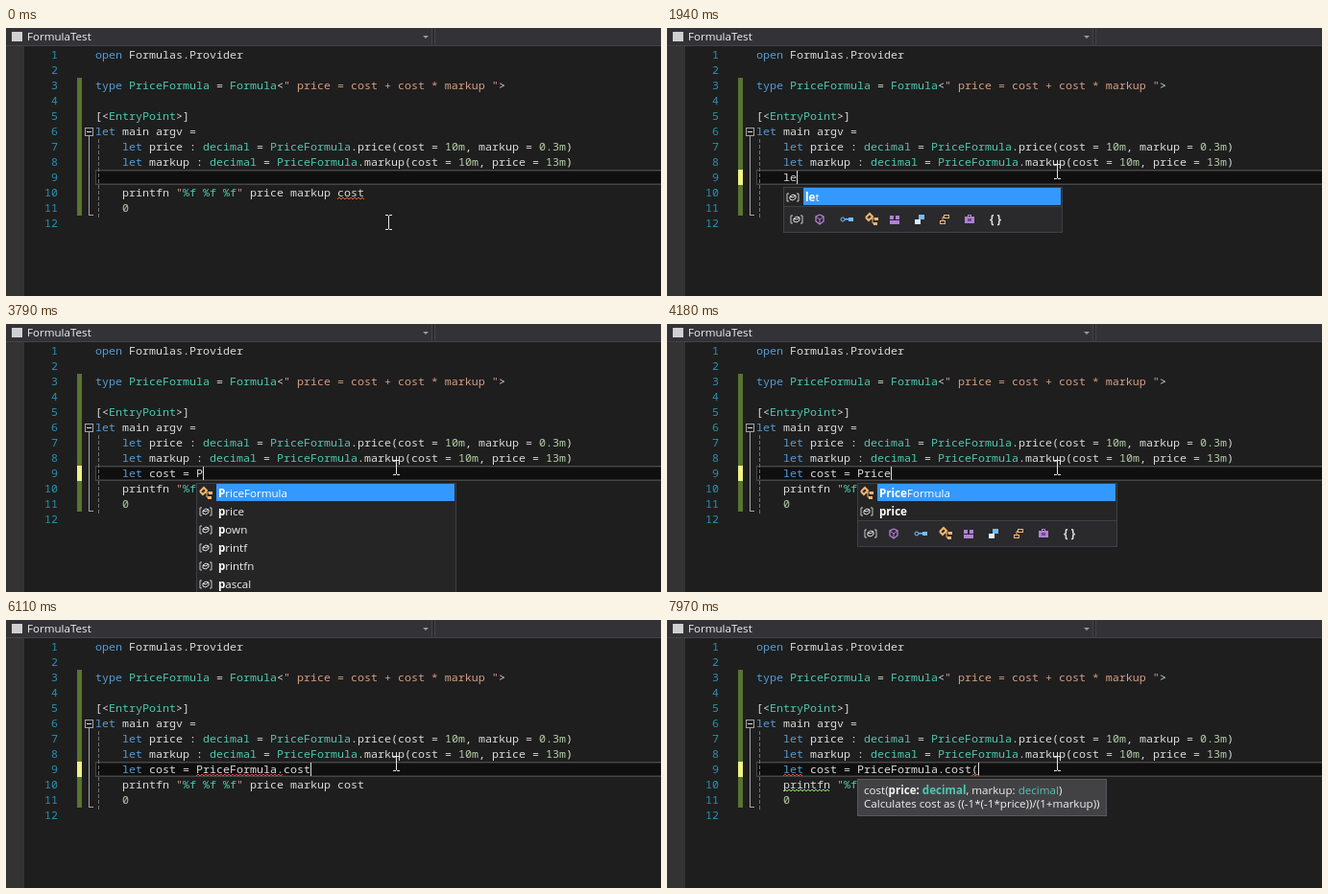
Recreate the animation shown at these times as an HTML page with a canvas. Size 682x280 px, loop 8 s.

```html
<!DOCTYPE html>
<html lang="en">
<head>
<meta charset="utf-8">
<title>Formula editor</title>
<style>
  html, body { margin: 0; width: 100%; height: 100%; overflow: hidden; background: #1e1e1e; }
  canvas { display: block; }
</style>
</head>
<body>
<canvas id="stage" width="682" height="280"></canvas>
<script>
const ctx = document.getElementById('stage').getContext('2d');
const LOOP = 8000, CHAR = 7, CODE_X = 93, EDIT_X = 121, EDIT_LINE = 9;
const MONO = '11.6667px "Noto Sans Mono", monospace';
const UI = '11.6px "Open Sans", sans-serif';
const PLAIN = '#dcdcdc', KEYWORD = '#569cd6', TYPE = '#4ec9b0', STRING = '#d69d85', NUMBER = '#b5cea8';
const ORANGE = '#efb672', PURPLE = '#b180d7', BLUE = '#75beff', RED = '#f0483e', GREEN = '#95db7d';

const lines = [
  'open Formulas.Provider',
  '',
  'type PriceFormula = Formula<" price = cost + cost * markup ">',
  '',
  '[<EntryPoint>]',
  'let main argv =',
  '    let price : decimal = PriceFormula.price(cost = 10m, markup = 0.3m)',
  '    let markup : decimal = PriceFormula.markup(cost = 10m, price = 13m)',
  '',
  '    printfn "%f %f %f" price markup cost',
  '    0',
  ''
];

const typed = 'let cost = PriceFormula.cost(';
// [time, characters typed]; each entry also restarts the caret blink
const keys = [
  [80, 0], [1770, 1], [1920, 2], [2080, 3], [2240, 4], [2470, 5], [2620, 6], [2770, 7], [2850, 8],
  [3020, 9], [3250, 10], [3400, 11], [3710, 12], [3860, 13], [3940, 14], [4020, 15], [4180, 16],
  [4350, 16], [5030, 23], [5340, 24], [5890, 25], [5970, 28], [6900, 29]
];
const mousePath = [[70, 398, 203], [400, 101, 156], [650, 300, 123], [910, 406, 150]];

const lists = [
  { from: 1840, to: 2240, col: 0, width: 291, filters: true,
    items: ['let', 'lazy', 'ldexp', 'List', 'list', 'lock', 'log', 'log10'] },
  { from: 3790, to: 5030, col: 11, width: 271, filters: true,
    items: ['PriceFormula', 'price', 'pown', 'printf', 'printfn', 'pascal', 'pi'] },
  { from: 5420, to: 6110, col: 24, width: 92, filters: false, items: ['cost', 'markup', 'price'] }
];

const lineTop = n => 4 + 16 * n;

function rect(x, y, w, h, color) {
  ctx.fillStyle = color;
  ctx.fillRect(x, y, w, h);
}

function frame(x, y, w, h, color) {
  ctx.strokeStyle = color;
  ctx.strokeRect(x + .5, y + .5, w - 1, h - 1);
}

function path(points, color, width = 1) {
  ctx.beginPath();
  points.forEach(([x, y]) => ctx.lineTo(x, y));
  ctx.strokeStyle = color;
  ctx.lineWidth = width;
  ctx.stroke();
  ctx.lineWidth = 1;
}

// Draws text and returns the x where it ends
function text(str, x, y, color, font) {
  ctx.font = font;
  ctx.fillStyle = color;
  ctx.fillText(str, x, y);
  return x + ctx.measureText(str).width;
}

function tokenColor(token) {
  if (/^(open|type|let)$/.test(token)) return KEYWORD;
  if (/^(PriceFormula|Formula|EntryPoint|decimal|%f)$/.test(token)) return TYPE;
  if (token[0] === '"') return STRING;
  return /^\d/.test(token) ? NUMBER : PLAIN;
}

function code(str, x, n, color = tokenColor) {
  for (const m of str.matchAll(/"[^"%]*"|%f|\d[\d.]*m?|\w+|[^\s\w]/g))
    text(m[0], x + m.index * CHAR, lineTop(n) + 12, color(m[0]), MONO);
}

function squiggle(x, end, n, color) {
  const points = [];
  for (let i = 0; x + i * 2 <= end; i++) points.push([x + i * 2, lineTop(n) + (i % 2 ? 13 : 15)]);
  path(points, color);
}

const icons = {
  value(x, y) {
    path([[x - 4, y - 4], [x - 6, y - 4], [x - 6, y + 4], [x - 4, y + 4]], '#c8c8c8');
    path([[x + 4, y - 4], [x + 6, y - 4], [x + 6, y + 4], [x + 4, y + 4]], '#c8c8c8');
    path([[x - 3, y - 1], [x, y - 3], [x + 3, y - 2], [x + 3, y + 1], [x, y + 3], [x - 3, y + 2], [x - 3, y - 1], [x, y], [x + 3, y - 2]], '#e0e0e0');
  },
  method(x, y) {
    path([[x, y - 5], [x + 4, y - 3], [x + 4, y + 2], [x, y + 5], [x - 4, y + 2], [x - 4, y - 3], [x, y - 5]], PURPLE, 1.3);
    path([[x - 4, y - 3], [x, y], [x + 4, y - 3]], PURPLE);
    path([[x, y], [x, y + 5]], PURPLE);
  },
  link(x, y) {
    ctx.beginPath();
    ctx.arc(x - 4, y, 2, 0, 7);
    ctx.strokeStyle = BLUE;
    ctx.stroke();
    rect(x - 2, y - 1, 5, 1.5, BLUE);
    rect(x + 2, y - 2, 5, 4, BLUE);
  },
  type(x, y) {
    path([[x - 6, y - 2], [x - 2, y - 6], [x + 1, y - 3], [x - 3, y + 1], [x - 6, y - 2]], ORANGE, 2);
    path([[x - 1, y - 1], [x + 5, y - 1]], ORANGE);
    path([[x + 1, y - 1], [x + 1, y + 4], [x + 4, y + 4]], ORANGE);
    rect(x + 3, y - 2, 4, 3, ORANGE);
    rect(x + 2, y + 3, 4, 3, ORANGE);
  },
  module(x, y) {
    rect(x - 5, y - 4, 4, 4, PURPLE);
    rect(x + 1, y - 4, 4, 4, PURPLE);
    rect(x - 5, y + 1, 10, 4, PURPLE);
  },
  struct(x, y) {
    rect(x - 1, y - 5, 6, 5, BLUE);
    rect(x - 5, y, 6, 5, '#dcecff');
  },
  union(x, y) {
    frame(x - 1, y - 5, 6, 4, ORANGE);
    frame(x - 5, y + 1, 6, 4, ORANGE);
    path([[x - 2, y + 1], [x - 2, y - 2.5], [x, y - 2.5]], ORANGE);
  },
  box(x, y) {
    rect(x - 5, y - 3, 10, 7, PURPLE);
    frame(x - 2, y - 5, 4, 3, PURPLE);
    rect(x - 2, y - 1, 4, 3, '#6c4c86');
  },
  braces(x, y) {
    text('{ }', x - 7, y + 4, '#e0e0e0', 'bold ' + UI);
  }
};
const filterBar = [['value', 14], ['method', 38], ['link', 66], ['type', 92], ['module', 116],
  ['struct', 142], ['union', 168], ['box', 194], ['braces', 222]];

function completion({ col, width, items, filters }, entered) {
  const prefix = entered.slice(col);
  const rows = items.filter(s => s.toLowerCase().startsWith(prefix.toLowerCase()));
  const x = EDIT_X + col * CHAR, y = lineTop(EDIT_LINE + 1) + 2;
  const listHeight = rows.length * 19 + 3, height = listHeight + (filters ? 26 : 0);
  rect(x, y, width, height, '#252526');
  frame(x, y, width, height, '#3f3f46');
  rows.forEach((name, i) => {
    const top = y + 1 + i * 19;
    if (!i) rect(x + 21, top, width - 23, 18, '#3399ff');
    const icon = !filters ? 'method' : /^[A-Z]/.test(name) ? 'type' : 'value';
    icons[icon](x + 10, top + 10);
    const end = text(name.slice(0, prefix.length), x + 23, top + 14, '#fff', 'bold ' + UI);
    text(name.slice(prefix.length), end, top + 14, i ? '#f1f1f1' : '#fff', UI);
  });
  if (filters) {
    rect(x + 1, y + listHeight - 2, width - 2, 27, '#2a2a2c');
    rect(x + 1, y + listHeight - 2, width - 2, 1, '#3f3f46');
    for (const [name, dx] of filterBar) icons[name](x + dx, y + listHeight + 12);
  }
}

function signatureTip() {
  rect(198, 166, 260, 39, '#424245');
  frame(198, 166, 260, 39, '#5a5a5e');
  let x = 205;
  for (const [str, color, weight] of [['cost(', '#f1f1f1', ''], ['price: ', '#f1f1f1', 'bold '],
    ['decimal', TYPE, 'bold '], [', markup: ', '#f1f1f1', ''], ['decimal', TYPE, ''], [')', '#f1f1f1', '']])
    x = text(str, x, 182, color, weight + UI);
  text('Calculates cost as ((-1*(-1*price))/(1+markup))', 205, 196, '#f1f1f1', UI);
}

function chrome(t) {
  rect(0, 0, 682, 280, '#1e1e1e');
  rect(0, 19, 19, 261, '#333333');
  rect(0, 0, 682, 18, '#333337');
  rect(0, 18, 682, 1, '#434346');
  rect(443, 0, 1, 18, '#434346');
  rect(444, 0, 2, 18, '#2d2d30');
  rect(446, 0, 1, 18, '#434346');
  rect(6, 4, 11, 10, '#d0d0d0');
  text('FormulaTest', 22, 13, '#f1f1f1', UI);
  ctx.beginPath();
  [[434, 8], [440, 8], [437, 11]].forEach(([x, y]) => ctx.lineTo(x, y));
  ctx.fillStyle = '#999';
  ctx.fill();

  rect(74, lineTop(3), 5, 144, '#577430');
  if (t >= 1770) rect(74, lineTop(EDIT_LINE), 5, 16, '#eff284');

  rect(CODE_X, 148, 589, 16, '#464646');
  rect(CODE_X + 1, 149.5, 588, 13, '#0f0f0f');

  frame(82, 104, 9, 9, '#a5a5a5');
  rect(84, 108, 5, 1, '#e0e0e0');
  rect(86, 113, 1, 83, '#a5a5a5');
  rect(86, 195, 5, 1, '#a5a5a5');
  for (let y = 116; y < 196; y += 6) rect(96, y, 1, 4, '#707070');
}

function mouse(t) {
  let i = 0;
  while (i < mousePath.length - 2 && t > mousePath[i + 1][0]) i++;
  const [a, b] = [mousePath[i], mousePath[i + 1]];
  const k = Math.min(1, Math.max(0, (t - a[0]) / (b[0] - a[0])));
  const x = Math.round(a[1] + (b[1] - a[1]) * k), y = Math.round(a[2] + (b[2] - a[2]) * k);
  for (const dy of [-8, 7]) {
    rect(x - 3, y + dy, 3, 1, '#e6e6e6');
    rect(x + 1, y + dy, 3, 1, '#e6e6e6');
  }
  rect(x, y - 7, 1, 14, '#e6e6e6');
}

function draw(t) {
  chrome(t);
  lines.forEach((line, i) => {
    const label = String(i + 1);
    text(label, 54 - label.length * CHAR, lineTop(i + 1) + 12, '#2b91af', MONO);
    code(line, CODE_X, i + 1);
  });

  const key = keys.filter(k => k[0] <= t).pop();
  const entered = typed.slice(0, key ? key[1] : 0);
  code(entered, EDIT_X, EDIT_LINE, s => s === 'let' ? KEYWORD : PLAIN);
  if (key && (t - key[0]) % 1060 < 530) rect(EDIT_X + entered.length * CHAR, 149, 1, 14, PLAIN);

  if (t < 5490) squiggle(345, 373, 10, t < 1770 ? '#e0683c' : RED);
  if (t >= 6110 && t < 7040) squiggle(198, 288, EDIT_LINE, RED);
  if (t >= 7360) {
    squiggle(121, 142, EDIT_LINE, RED);
    squiggle(317, 325, EDIT_LINE, RED);
    squiggle(121, 170, 10, GREEN);
  }

  const list = lists.find(l => t >= l.from && t < l.to);
  if (list) completion(list, entered);
  if (t >= 6960) signatureTip();
  mouse(t);
}

function tick() {
  draw(performance.now() % LOOP);
  requestAnimationFrame(tick);
}
tick();
</script>
</body>
</html>
```
